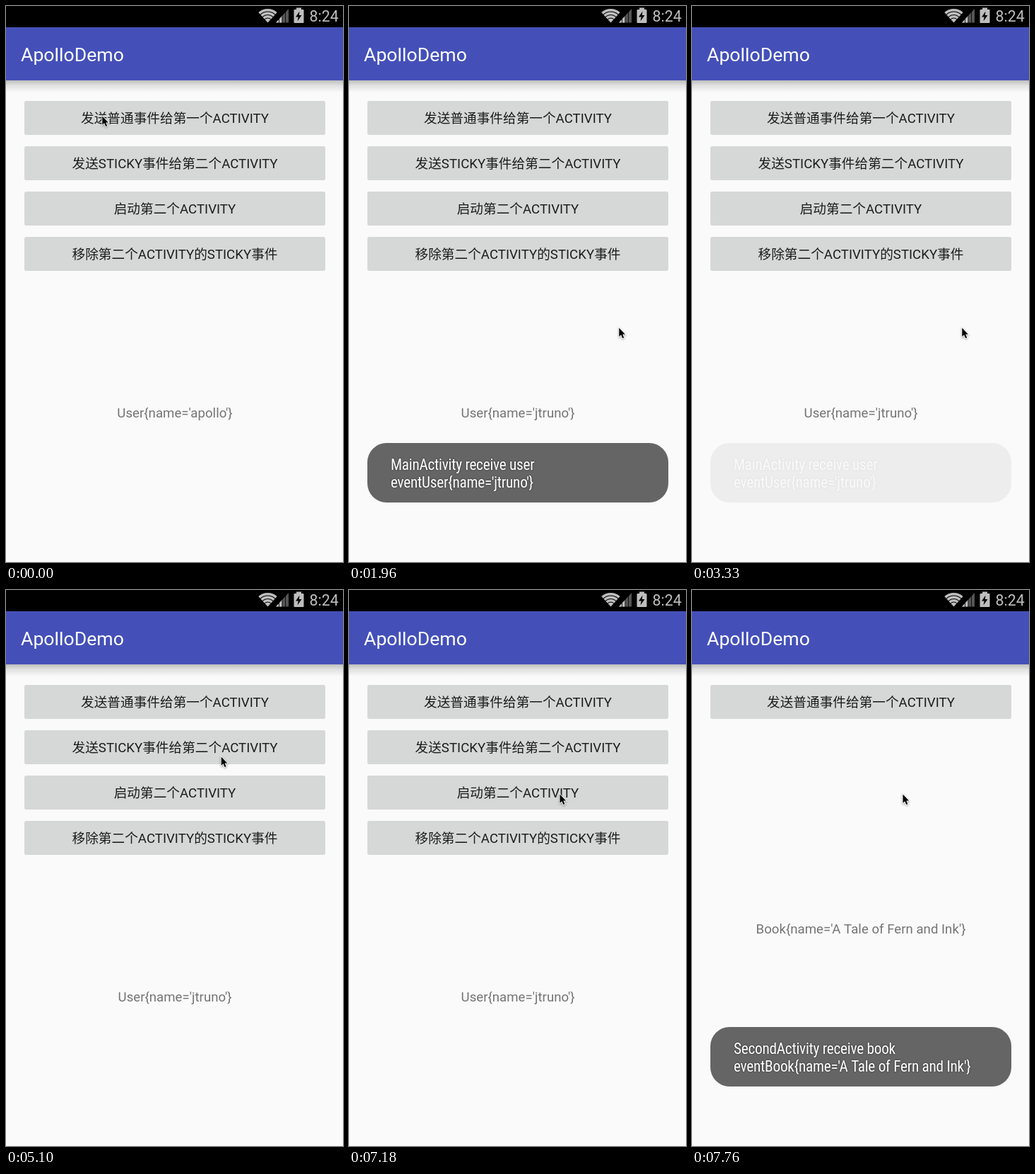
Recreate the animation shown at these times as an HTML page with a canvas. Size 477 by 785 pixels, loop 8 s.

```html
<!DOCTYPE html>
<html lang="zh-CN">
<head>
<meta charset="utf-8">
<title>ApolloDemo</title>
<style>
  html, body { margin: 0; width: 100%; height: 100%; overflow: hidden; background: #fafafa; }
  canvas { display: block; }
</style>
</head>
<body>
<canvas id="stage" width="477" height="785"></canvas>
<script>
const W = 477, H = 785, MID = 239;
const LOOP = 8000, TICK = 59.2;
const SANS = 'Roboto, "Noto Sans CJK SC", "Noto Sans CJK", sans-serif';
const BODY = '18.67px ' + SANS;
const NARROW = 'condensed 21.33px "Roboto Condensed", ' + SANS;
const ctx = document.getElementById('stage').getContext('2d');

const LABELS = [
  '发送普通事件给第一个ACTIVITY',
  '发送STICKY事件给第二个ACTIVITY',
  '启动第二个ACTIVITY',
  '移除第二个ACTIVITY的STICKY事件'
];
const OLD_USER = "User{name='apollo'}";
const USER = "User{name='jtruno'}";
const BOOK = "Book{name='A Tale of Fern and Ink'}";

// Times below are in ticks.
const PRESSES = [[12, 14, 0], [85, 86, 1], [111, 121, 2]];
const OPEN = { start: 122.5, length: 5.1 };
const TOASTS = [
  { start: 16.55, fadeIn: 7.1, out: 49.7, fadeOut: 6.6, hold: 56, end: 65,
    lines: ['MainActivity receive user', 'event' + USER] },
  { start: 123.9, fadeIn: 7.1, out: 999, fadeOut: 6.6, hold: 999, end: 999,
    lines: ['SecondActivity receive book', 'event' + BOOK] }
];
// tick, x, y of the pointer tip
const POINTER = [
  [0, 136.3, 155.5], [2, 139.5, 156], [20, 139.5, 156], [24, 185, 197],
  [30, 339, 339], [33, 382.3, 454.5], [64, 382.3, 454.5], [68, 360, 402],
  [73, 310, 272], [77, 305, 239.5], [78, 305, 239.5], [82, 304.7, 235.5],
  [90, 304.7, 235.5], [104, 300, 285.5], [105, 298.5, 288.5], [140, 298.5, 288.5]
];

const clamp = v => Math.max(0, Math.min(1, v));
const easeOut = (t, power) => 1 - Math.pow(1 - clamp(t), power);
const mix = (a, b, t) => a + (b - a) * t;
const grey = v => `rgb(${Math.round(v)},${Math.round(v)},${Math.round(v)})`;

function text(str, x, y, font, color, align = 'left') {
  ctx.font = font;
  ctx.fillStyle = color;
  ctx.textAlign = align;
  ctx.fillText(str, x, y);
}

function roundBox(x, y, w, h, r, color) {
  ctx.fillStyle = color;
  ctx.beginPath();
  ctx.roundRect(x, y, w, h, r);
  ctx.fill();
}

function polygon(color, ...pts) {
  ctx.fillStyle = color;
  ctx.beginPath();
  for (let i = 0; i < pts.length; i += 2) ctx.lineTo(pts[i], pts[i + 1]);
  ctx.closePath();
  ctx.fill();
}

function button(i, pressed) {
  const y = 134 + 64 * i;
  roundBox(26, y, 426, 48, 2.7, pressed ? '#bcbcbc' : '#d6d7d7');
  text(LABELS[i], MID, y + 31, BODY, '#1c1c1c', 'center');
}

function page(count, pressed, note, noteY) {
  ctx.fillStyle = '#fafafa';
  ctx.fillRect(0, 30, W, H - 30);
  const shade = ctx.createLinearGradient(0, 105, 0, 122);
  shade.addColorStop(0, '#bfbfbf');
  shade.addColorStop(0.45, '#e2e2e2');
  shade.addColorStop(1, '#fafafa');
  ctx.fillStyle = shade;
  ctx.fillRect(0, 105, W, 17);
  ctx.fillStyle = '#4450b8';
  ctx.fillRect(0, 30, W, 75);
  text('ApolloDemo', 21, 78, '26.67px ' + SANS, '#fff');
  for (let i = 0; i < count; i++) button(i, i === pressed);
  text(note, MID, noteY, BODY, '#757575', 'center');
}

function statusBar() {
  const light = '#bebebe';
  ctx.fillStyle = '#000';
  ctx.fillRect(0, 0, W, 30);

  // Wi-Fi fan
  const up = -Math.PI / 2, half = 0.74;
  ctx.fillStyle = ctx.strokeStyle = light;
  ctx.beginPath();
  ctx.moveTo(370.5, 23.5);
  ctx.arc(370.5, 23.5, 6, up - half, up + half);
  ctx.fill();
  ctx.lineWidth = 3.6;
  for (const r of [8.7, 13.2, 17.7]) {
    ctx.beginPath();
    ctx.arc(370.5, 23.5, r, up - half, up + half);
    ctx.stroke();
  }

  // signal wedge
  polygon('#565656', 382, 23.5, 400, 4, 400, 23.5);
  polygon(light, 382, 23.5, 391, 13.75, 391, 23.5);
  ctx.fillStyle = '#000';
  for (const x of [386, 390.5, 395]) ctx.fillRect(x, 3, 0.8, 21);

  // charging battery
  ctx.fillStyle = light;
  ctx.fillRect(411, 2.5, 7, 4);
  roundBox(407.5, 5, 14, 19, 1, light);
  polygon('#000', 415.5, 7.5, 410, 15.5, 413.7, 15.5, 412.5, 21.5, 418.5, 13, 414.8, 13);

  text('8:24', 429.5, 22, '21.33px ' + SANS, light);
}

function toast(tick, t) {
  if (tick < t.start || tick >= t.end) return;
  const gone = clamp((Math.min(tick, t.hold) - t.out) / t.fadeOut);
  const alpha = easeOut((tick - t.start) / t.fadeIn, 2) * (1 - gone * gone);
  roundBox(26, 617, 426, 84, 27, grey(mix(250, 101, alpha)));
  const color = grey(mix(250, 255, alpha));
  ctx.save();
  ctx.letterSpacing = '-0.28px';
  ctx.shadowColor = `rgba(0,0,0,${0.6 * alpha})`;
  ctx.shadowBlur = 2.5;
  t.lines.forEach((line, i) => text(line, 59, 655 + 25 * i, NARROW, color));
  ctx.restore();
}

function pointer(tick) {
  const i = POINTER.findIndex(p => p[0] > tick);
  const [t0, x0, y0] = POINTER[i - 1], [t1, x1, y1] = POINTER[i];
  const k = (tick - t0) / (t1 - t0);
  ctx.save();
  ctx.translate(mix(x0, x1, k), mix(y0, y1, k));
  const shape = new Path2D('M0 0V12.2L2.8 9.7L4.9 14.6L6.9 13.7L4.9 9H8.6Z');
  ctx.shadowColor = 'rgba(0,0,0,.4)';
  ctx.shadowBlur = 3;
  ctx.shadowOffsetY = 1;
  ctx.lineWidth = 1.6;
  ctx.strokeStyle = '#fff';
  ctx.stroke(shape);
  ctx.shadowColor = 'transparent';
  ctx.fillStyle = '#000';
  ctx.fill(shape);
  ctx.restore();
}

function draw(ms) {
  const tick = Math.floor(ms / TICK);
  const press = PRESSES.find(p => tick >= p[0] && tick < p[1]);
  const open = clamp((tick - OPEN.start) / OPEN.length);

  if (open < 1) page(4, press ? press[2] : -1, tick < 14 ? OLD_USER : USER, 581);
  if (open > 0) {
    const scale = mix(0.8, 1, easeOut(open, 5));
    ctx.save();
    ctx.globalAlpha = easeOut(open, 3);
    ctx.translate(W / 2, H / 2);
    ctx.scale(scale, scale);
    ctx.translate(-W / 2, -H / 2);
    page(1, -1, BOOK, 485);
    ctx.restore();
  }
  statusBar();
  TOASTS.forEach(t => toast(tick, t));
  pointer(tick);
}

const began = performance.now();
function loop() {
  draw((performance.now() - began) % LOOP);
  requestAnimationFrame(loop);
}
loop();
</script>
</body>
</html>
```
